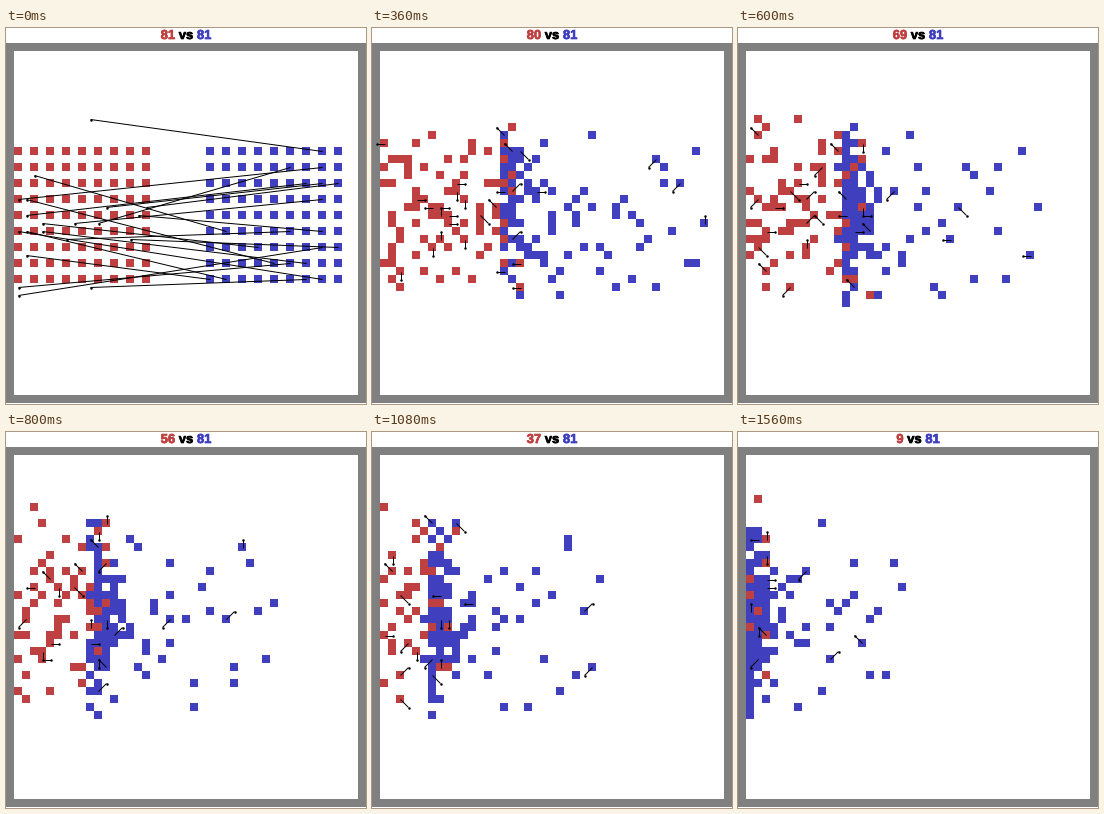
A matplotlib script that plays this animation: 360x376 px, repeating every 1600 ms.

```python
import numpy as np
import matplotlib.pyplot as plt
from matplotlib.animation import FuncAnimation
from matplotlib.collections import LineCollection
from matplotlib.patheffects import withStroke

W, H, CELL, TOP, SIDE = 360, 376, 8, 15, 45
FRAMES, INTERVAL = 40, 40
LAST = FRAMES - 1
PAPER, WALL = (255, 255, 255), (128, 128, 128)
RED, BLUE = (191, 64, 64), (64, 64, 191)
rng = np.random.default_rng(12)


def alive(t):
    """Red survivors: a long calm, then steady losses."""
    return round(np.interp(t, [0, 9, 15, 20, 27, 33, LAST],
                           [81, 80, 69, 56, 37, 24, 9]))


def contact(t):
    """Column where the blue line starts: a quick charge, then a slow push."""
    return np.interp(t, [0, 9, LAST], [25, 16, 1])


def blue_columns(s, t):
    front, rear = contact(t), np.interp(t, [0, 9, LAST], [41, 41, 20])
    crowding = np.interp(t, [0, 9, 15], [1, 2.5, 4])
    return front + (rear - front) * s ** crowding


def red_columns(s, t):
    edge = min(17 + t / 9, contact(t) + 2)
    return 1 + (edge - 1) * s ** 1.2


def rows(s, t, centre):
    """Even spread whose ends drift outwards."""
    u = 2 * s - 1
    return centre + 8 * u + 4 * min(1, t / 20) * u ** 5


def ranks(values):
    noisy = values + rng.normal(0, .7, len(values))
    return np.argsort(np.argsort(noisy)) / max(len(values) - 1, 1)


def block(left):
    return [(left + 2 * i, 13 + 2 * j) for i in range(9) for j in range(9)]


def advance(army, taken, columns, centre, t):
    """Each fighter takes the free cell nearest its place in the formation."""
    x, y = np.array(army, float).T
    goal = np.c_[columns(ranks(x), t), rows(ranks(y), t, centre)]
    for i in rng.permutation(len(army)):
        here, (gx, gy) = army[i], goal[i]
        x, y = here
        reach = 2 if np.hypot(gx - x, gy - y) > 1.5 else 1
        best, best_cost = here, np.inf
        for cx in range(max(x - reach, 1), min(x + reach, SIDE - 2) + 1):
            for cy in range(max(y - reach, 1), min(y + reach, SIDE - 2) + 1):
                if (cx, cy) in taken and (cx, cy) != here:
                    continue
                cost = np.hypot(gx - cx, gy - cy) + rng.uniform(0, 1.3)
                if cost < best_cost:
                    best, best_cost = (cx, cy), cost
        taken.remove(here)
        taken.add(best)
        army[i] = best


def cull(red, blue, count):
    """Red fighters closest to the enemy fall first."""
    foes = np.array(blue)
    while len(red) > count:
        gap = [np.hypot(*(foes - r).T).min() + rng.uniform(0, 1.5) for r in red]
        red.pop(int(np.argmin(gap)))


def to_pixels(lines):
    return np.array(lines) * CELL + (CELL / 2, TOP + CELL / 2)


def strokes(red, blue):
    lines = []
    for army, share in ((red, .24), (blue, .12)):
        for i in rng.choice(len(army), round(share * len(army)), replace=False):
            dx, dy = 0, 0
            while dx == dy == 0:
                dx, dy = rng.integers(-1, 2, 2)
            x, y = army[i]
            lines.append([(x + dx, y + dy), (x, y)])
    return to_pixels(lines)


def battle():
    red, blue = block(1), block(25)
    start = list(blue)
    scenes = [(list(red), start, None)]
    for t in range(1, FRAMES):
        cull(red, blue, alive(t))
        taken = set(red) | set(blue)
        advance(red, taken, red_columns, 21 - 3 * t / LAST, t)
        advance(blue, taken, blue_columns, 21, t)
        scenes.append((list(red), list(blue), strokes(red, blue)))
    # The loop opens with strokes back from where the fight ended
    picks = rng.choice(len(blue), 20, replace=False)
    opening = to_pixels([[blue[i], start[i]] for i in picks])
    scenes[0] = (*scenes[0][:2], opening)
    return scenes


def field(red, blue):
    grid = np.full((SIDE, SIDE, 3), WALL, np.uint8)
    grid[1:-1, 1:-1] = PAPER
    for army, color in ((red, RED), (blue, BLUE)):
        for x, y in army:
            grid[y, x] = color
    return grid


def rgb(color):
    return tuple(v / 255 for v in color)


scenes = battle()
fig = plt.figure(figsize=(W / 100, H / 100), dpi=100, facecolor=rgb(PAPER))
ax = fig.add_axes([0, 0, 1, 1])
ax.axis("off")
board = ax.imshow(field(*scenes[0][:2]), extent=(0, W, H - 1, TOP),
                  interpolation="nearest", aspect="auto")
ax.set(xlim=(0, W), ylim=(H, 0))
rays = LineCollection([], colors="black", linewidths=.72, zorder=3)
ax.add_collection(rays, autolim=False)
dots = ax.scatter([], [], s=3.2, c="black", linewidths=0, zorder=4)

EM = 13
DIGIT, SPACE = .556 * EM, .278 * EM


def label(text, color, ha):
    heavy = [withStroke(linewidth=.5, foreground=color)]
    return ax.text(W / 2, 11, text, color=color, ha=ha, va="baseline",
                   family="Liberation Sans", weight="bold", size=EM * .72,
                   path_effects=heavy)


left = label("", rgb(RED), "left")
middle = label("vs", "black", "left")
right = label("", rgb(BLUE), "right")


def draw(n):
    red, blue, lines = scenes[n]
    board.set_data(field(red, blue))
    rays.set_segments(lines + .5)
    dots.set_offsets(lines[:, 0] + .5)
    a, b = str(len(red)), str(len(blue))
    half = (DIGIT * (len(a) + len(b) + 2) + 2 * SPACE) / 2
    left.set_text(a)
    left.set_x(W / 2 - half)
    middle.set_x(W / 2 - half + DIGIT * len(a) + SPACE)
    right.set_text(b)
    right.set_x(W / 2 + half)
    return board, rays, dots, left, middle, right


anim = FuncAnimation(fig, draw, frames=FRAMES, interval=INTERVAL, repeat=True,
                     repeat_delay=0, blit=False)
plt.show()
```
